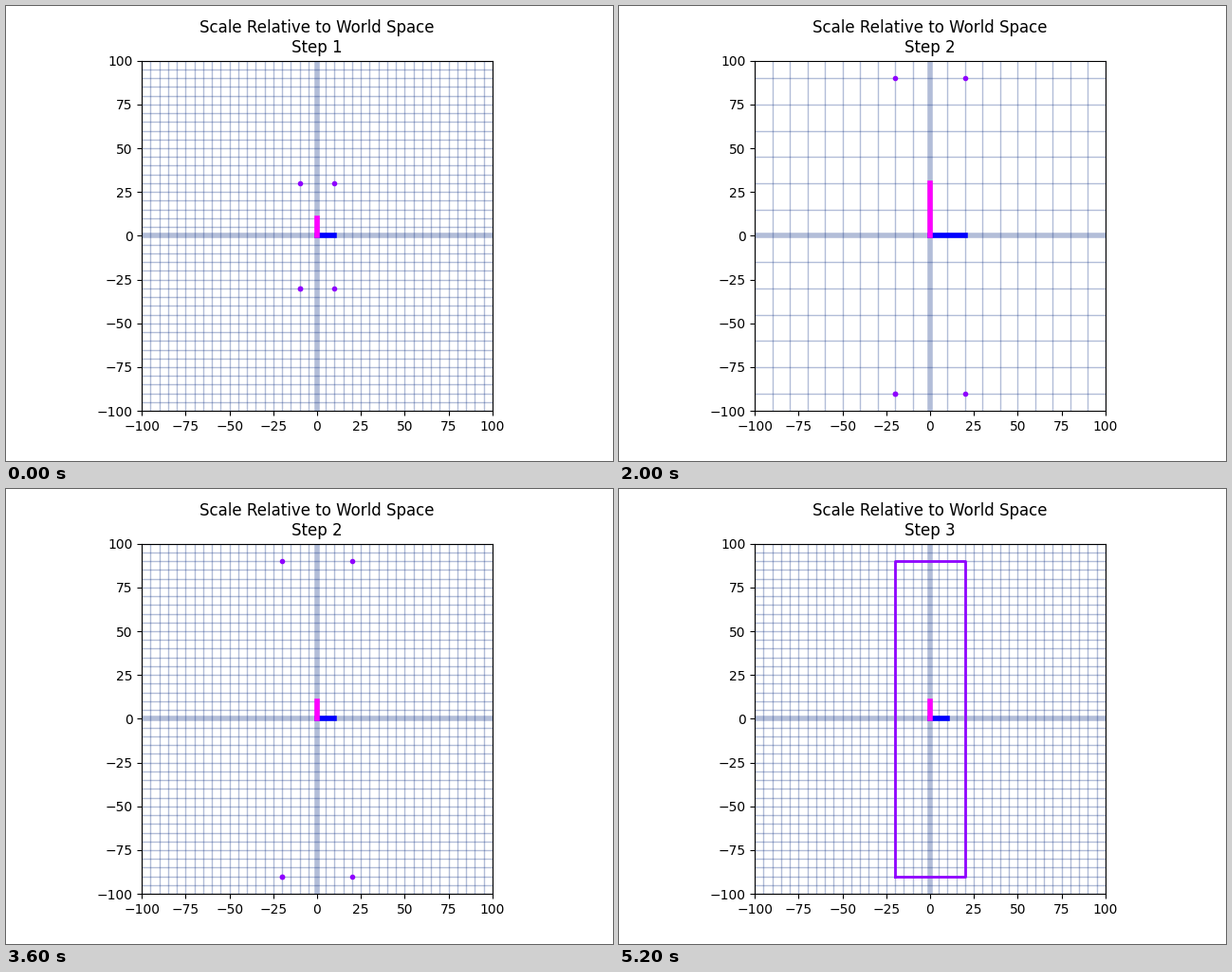
Recreate the animation shown at these times as a matplotlib script. Size 640x480 px, loop 6000 ms.

```python
import numpy as np
import matplotlib.pyplot as plt
from matplotlib.animation import FuncAnimation

LIMIT = 100
CELL = 5
BASIS = 10
SCALE = np.array([2, 3])
GRID_STYLE = dict(color="#03257E", alpha=0.3)
VIOLET = "#8F00FF"

corners = np.array([(-10, -30), (-10, 30), (10, 30), (10, -30), (-10, -30)])

# One entry per second: step number, space scale, shape scale, outline drawn
UNIT = np.array([1, 1])
TIMELINE = [
    (1, UNIT, UNIT, False),
    (1, UNIT, UNIT, False),
    (2, SCALE, SCALE, False),
    (2, UNIT, SCALE, False),
    (3, UNIT, SCALE, True),
    (3, UNIT, SCALE, True),
]

fig, ax = plt.subplots(figsize=(6.4, 4.8), dpi=100)


def draw_grid(scale):
    count = LIMIT // CELL
    for k in range(-count, count + 1):
        x, y = k * CELL * scale
        width = 4 if k == 0 else 1
        if abs(x) <= LIMIT:
            ax.plot([x, x], [-LIMIT, LIMIT], lw=width, **GRID_STYLE)
        if abs(y) <= LIMIT:
            ax.plot([-LIMIT, LIMIT], [y, y], lw=width, **GRID_STYLE)


def draw_basis(scale):
    x, y = BASIS * scale
    ax.plot([0, x], [0, 0], color="blue", lw=4)
    ax.plot([0, 0], [0, y], color="magenta", lw=4)


def draw_shape(scale, outlined):
    x, y = (corners * scale).T
    if outlined:
        ax.plot(x, y, color=VIOLET, lw=2)
    else:
        ax.plot(x, y, ".", color=VIOLET)


def update(frame):
    step, space_scale, shape_scale, outlined = TIMELINE[frame]
    ax.clear()
    ax.set_aspect("equal")
    ax.set_xlim(-LIMIT, LIMIT)
    ax.set_ylim(-LIMIT, LIMIT)
    ax.set_title(f"Scale Relative to World Space\nStep {step}")
    draw_grid(space_scale)
    draw_basis(space_scale)
    draw_shape(shape_scale, outlined)
    return []


anim = FuncAnimation(fig, update, frames=len(TIMELINE), interval=1000,
                     repeat=True, repeat_delay=0)
plt.show()
```
